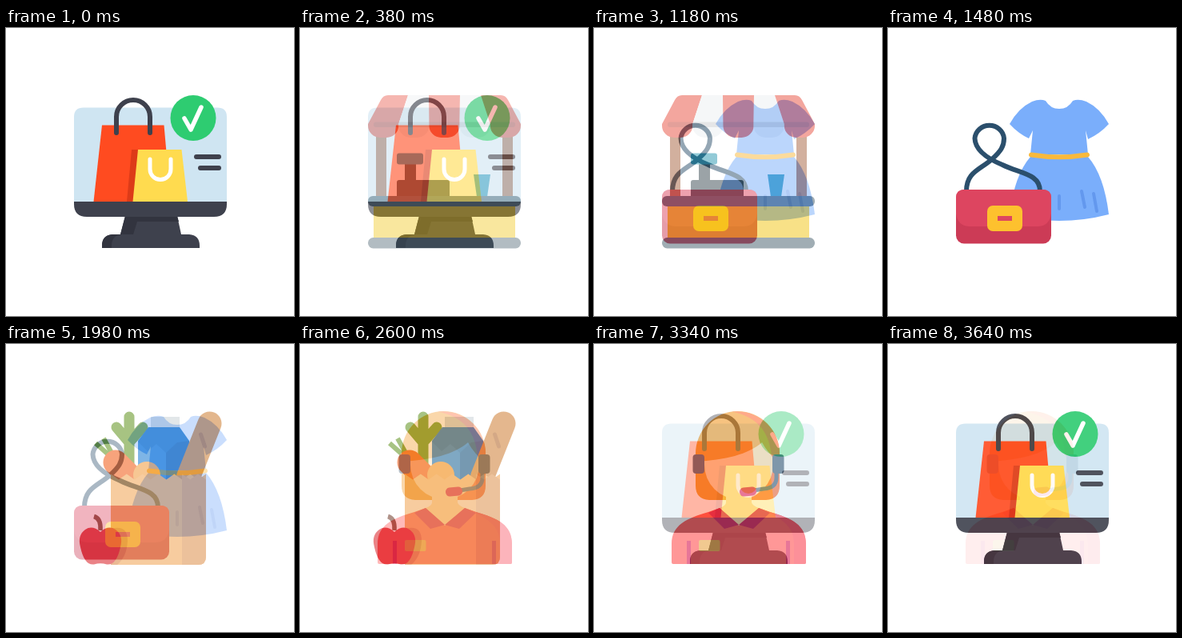
Recreate the animation shown at these times as an HTML page. Size 360 px wide and 360 px high, loop 3700 ms.

```html
<!DOCTYPE html>
<html lang="en">
<head>
<meta charset="utf-8">
<title>Shopping icons</title>
<style>
  html, body { margin: 0; width: 100%; height: 100%; overflow: hidden; background: #fff; }
  svg { display: block; width: 100vw; height: 100vh; }
</style>
</head>
<body>
<svg id="stage" viewBox="0 0 360 360" xmlns="http://www.w3.org/2000/svg"></svg>
<script>
const HOLD = 200, STEP = 60, STEPS = 10;
const SPAN = HOLD + STEP * (STEPS - 1);

const fill = (d, color) => `<path d="${d}" fill="${color}"/>`;
const line = (d, color, width, cap = 'round') =>
  `<path d="${d}" fill="none" stroke="${color}" stroke-width="${width}" stroke-linecap="${cap}" stroke-linejoin="round"/>`;
const box = (x, y, w, h, color, r = 0) =>
  `<rect x="${x}" y="${y}" width="${w}" height="${h}" rx="${r}" fill="${color}"/>`;
const disc = (x, y, r, color) => `<circle cx="${x}" cy="${y}" r="${r}" fill="${color}"/>`;

function monitor() {
  const dark = '#3e414d', shade = '#32343f';
  return [
    // stand
    fill('M149 235H214L219 258H229Q242 259 242 272V275H120V272Q120 259 133 258H143Z', dark),
    fill('M149 235H214L216 242H164L159 258H143Z', shade),
    fill('M133 258H145Q132 259 132 272V275H120V272Q120 259 133 258Z', shade),
    // screen
    fill('M85 217V111Q85 99.500 97 99.500H264Q276 99.500 276 111V217Z', '#cfe5f2'),
    fill('M85 217H276V220Q276 236 260 236H101Q85 236 85 220Z', dark),
    // bags
    fill('M120 121.500H197.500L206 217H109.500Z', '#ff4b20'),
    fill('M157 152H166L160 217H151Z', '#dd3b18'),
    fill('M165 152H219.500L227 217H158.500Z', '#ffdb4f'),
    line('M138 131V111a21 21 0 0 1 42 0V131', dark, 6),
    line('M180 164V176.500a13 13 0 0 0 26 0V164', '#fff', 5),
    // badge and lines
    disc(234, 112.5, 28.5, '#2ecc71'),
    line('M223 113L231 127L244 99', '#fff', 5.5),
    line('M238 161H266M243 175H266', dark, 6)
  ].join('');
}

function stall() {
  const slate = '#405a68', till = '#37474f', red = '#e74c3c', pale = '#ecf0f1';
  const top = [103, 135, 161, 200, 226, 258], width = 38.2;
  let awning = '';
  for (let i = 0; i < 5; i++) {
    const right = 85 + (i + 1) * width;
    const start = i === 0 ? 'M101 90Q104 84 110 84' : `M${top[i]} 84`;
    const end = i === 4 ? 'H251Q257 84 260 90' : `H${top[i + 1]}`;
    awning += fill(`${start}${end}L${right} 120V122a15 15 0 0 1 -15 15h${30 - width}a15 15 0 0 1 -15 -15V120Z`,
      i % 2 ? pale : red);
  }
  return [
    box(95, 130, 13, 82, '#a6603d'),
    box(253, 130, 13, 82, '#a6603d'),
    awning,
    box(92, 117.5, 177, 6.5, 'rgba(0,0,0,.14)', 3),
    // till and cup
    box(131, 168, 14, 24, till),
    box(121, 156.5, 33, 14, '#2596b0', 3),
    fill('M121 210V193Q121 190 124 190H184Q187 190 187 193V210Z', till),
    fill('M217 183H238L234 211H221Z', '#1e96ba'),
    // counter
    box(92, 222, 177, 42, '#f1c40f'),
    box(85, 210, 191, 13, slate, 6),
    box(85, 262, 191, 13.5, slate, 6.5)
  ].join('');
}

function clothes() {
  const blue = '#7aaefb', fold = '#6398ee';
  return [
    // dress
    fill('M152 120Q163 100 180 92Q190 88 197 91Q203 101 214 101Q225 101 231 91Q238 88 248 92Q265 100 276 120' +
      'Q265 132 250 139L247 128L250 158H178L181 128L176 138Q163 132 152 120Z', blue),
    fill('M178 161H250Q270 184 276 233Q214 249 152 233Q158 184 178 161Z', blue),
    line('M242 204L246 224M257 207L261 229M214 210V226', fold, 4),
    line('M179 158.500Q214 164 249 158.500', '#f9b93c', 6),
    // handbag
    line('M98 204C98 180 114 178 130 164C141 154 145 148 145 138A18.300 17.500 0 0 0 108.500 138' +
      'C109 153 126 164 143 171C165 182 190 182 190 204', '#2b4f6c', 6),
    box(85, 202, 119, 67.5, '#cc3b56', 10),
    fill('M95 202H194Q204 202 204 212V232Q202 247 188 248H101Q87 247 85 232V212Q85 202 95 202Z', '#dd4560'),
    box(124, 222, 44, 32, '#fdc12e', 7),
    box(137, 235, 18, 6, '#dd4560')
  ].join('');
}

function groceries() {
  const green = '#6d9c30';
  let rim = '';
  for (let i = 0; i <= 12; i++) rim += `L${131 + i * 119 / 12} ${i % 2 ? 169.5 : 162.5}`;
  return [
    // greens
    line('M154 91V166M138 104L154 123L171 104', green, 13),
    // carton
    box(181, 91, 36, 14, '#cfd8dc'),
    fill('M178 104H217L229 121V175H165V121Z', '#1f7ac8'),
    fill('M165 122L177 134L188 125L200 136V175H165Z', '#2a85d6'),
    fill('M200 136L214 123L229 121V175H200Z', '#1b6db8'),
    // carrot
    line('M112 124L130 140M122 118L132 136', green, 6, 'butt'),
    line('M137 148L152 163', '#f36726', 31),
    disc(176, 164, 17, '#f3a24d'),
    // bread
    line('M254.500 99.500L228 166', '#d28842', 30),
    line('M243.500 113L248.500 128', '#b86f35', 5),
    // paper bag
    fill(`M131 276${rim}V266Q250 276 240 276Z`, '#f2ab60'),
    fill('M220 276V162.500L230.200 169.500L240 162.500L250 169.500V266Q250 276 240 276Z', '#e0995a'),
    fill('M131 231Q152 225 152 246Q151 266 139 276H131Z', '#dd8d50'),
    // apple
    fill('M118 235Q128 226 137 232Q147 239 143 254Q138 277 126 275.500Q118 273 110 275.500Q98 277 93 254' +
      'Q89 239 99 232Q108 226 118 235Z', '#dd3036'),
    line('M110 215.500Q119 218 118 233', '#7b4a3a', 5.5, 'butt')
  ].join('');
}

function agent() {
  const skin = '#ffdca8', light = '#f39c2c', deep = '#ff713c', slate = '#4a647b', crimson = '#d81b54';
  return [
    // hair behind the face
    fill('M127 137H181V195H144Q127 194 127 177Z', light),
    fill('M181 137H232V177Q232 194 215 195H181Z', deep),
    // shirt
    fill('M97 273V250C97 226 116 218 143 210L157 205H206L220 210C247 218 265 226 265 250V273Q265 275 263 275H99Q97 275 97 273Z', '#ff5252'),
    fill('M220 210C247 218 265 226 265 250V273Q265 275 263 275H250V250C250 230 240 220 206 205Z', '#fa4656'),
    fill('M165 185H197V198Q198 202 206 205L181 227L157 205Q165 202 165 198Z', skin),
    fill('M143 211L157 205L181 226L163 231Z', crimson),
    fill('M220 211L206 205L181 226L199 231Z', crimson),
    line('M118.500 246V275M242.500 246V275', crimson, 5, 'butt'),
    box(131, 245, 26.5, 14, '#e9a646', 2),
    // head
    fill('M138 135H224V151a43 43 0 0 1 -86 0Z', skin),
    fill('M170 142L210 121L225 142V150H170Z', skin),
    fill('M127 147V137A52.500 53 0 0 1 232 137V148Q218 138 210 123C193 138 164 145 127 147Z', light),
    fill('M172 84.500H180A52.500 53 0 0 1 232 137V148Q226 144 222 140C219 110 205 91 172 84.500Z', deep),
    // headset
    box(123.5, 138, 14.5, 24, slate, 4),
    box(223, 138, 14.5, 24, slate, 4),
    line('M228 160V167Q228 180 212 181L200 183', slate, 5),
    `<g transform="rotate(-6 192.500 184.500)">${box(182, 179, 21, 11, crimson, 5)}</g>`
  ].join('');
}

const stage = document.getElementById('stage');
const scenes = [monitor, stall, clothes, groceries, agent].map(draw => {
  const g = document.createElementNS(stage.namespaceURI, 'g');
  g.innerHTML = box(0, 0, 360, 360, '#fff') + draw();
  return g;
});

let shown = '';
function render(time) {
  const t = time % (SPAN * scenes.length);
  const index = Math.floor(t / SPAN);
  const local = t - index * SPAN;
  const mix = local < HOLD ? 0 : (Math.floor((local - HOLD) / STEP) + 1) / STEPS;
  const key = `${index}:${mix}`;
  if (key === shown) return;
  shown = key;
  const current = scenes[index], next = scenes[(index + 1) % scenes.length];
  current.setAttribute('opacity', 1);
  next.setAttribute('opacity', mix);
  stage.replaceChildren(current, next);
}

const start = performance.now();
function tick() {
  render(performance.now() - start);
  requestAnimationFrame(tick);
}
tick();
</script>
</body>
</html>
```
